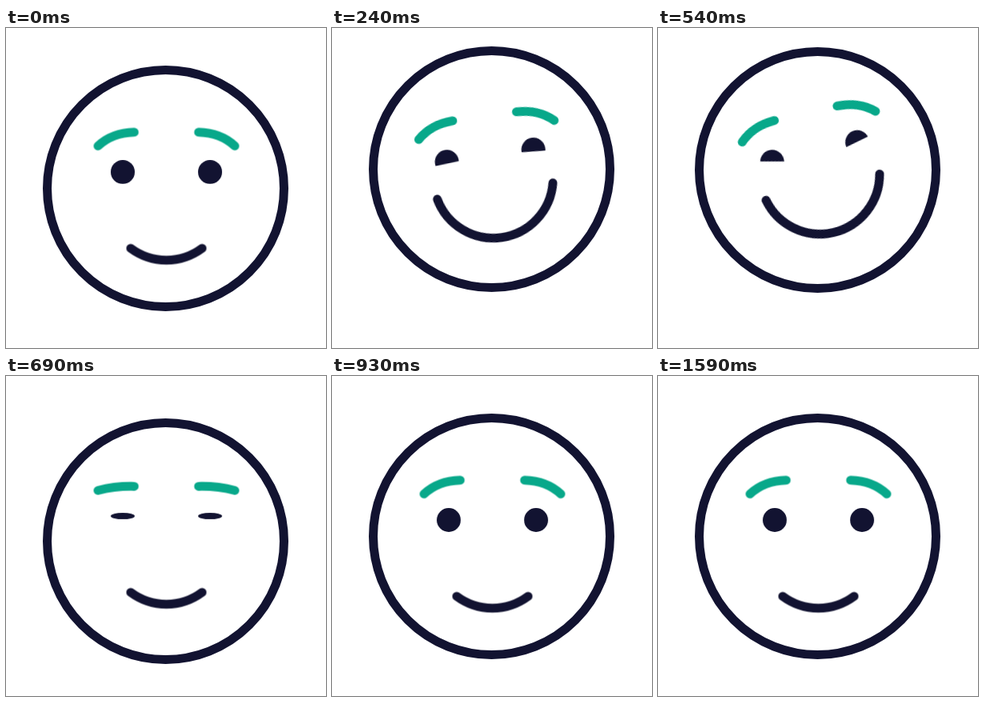
An HTML page without scripts for the animation above (3870 ms loop, 400 px wide and 400 px high).

```html
<!DOCTYPE html>
<html lang="en">
<head>
<meta charset="utf-8">
<title>Laughing face</title>
<style>
  html, body { margin: 0; height: 100%; overflow: hidden; background: #fff; }
  svg { display: block; width: 100%; height: 100%; }

  .line { fill: none; stroke: #121331; stroke-width: 11; stroke-linecap: round; }
  .brow { stroke: #08a88a; d: path("M-85.5 -53Q-68 -69.5 -40.2 -70.3"); }
  .eye { fill: #121331; }
  .lid { transform: translateY(20px); }

  .head, .features, .brow, .eye, .lid, .mouth { animation: 3.87s linear infinite; }
  .head { animation-name: bob; }
  .features { animation-name: tilt; }
  .brow { animation-name: frown; }
  .eye { animation-name: blink; }
  .lid { animation-name: squint; }
  .mouth { animation-name: smile; }

  @keyframes bob {
    0% { transform: none; animation-timing-function: ease-in-out; }
    2.8% { transform: translateY(6px); animation-timing-function: ease-in-out; }
    6.2% { transform: translateY(-24px); animation-timing-function: ease-out; }
    8.5% { transform: translateY(-27px); animation-timing-function: ease-in-out; }
    13.95% { transform: translateY(-23px); animation-timing-function: ease-in-out; }
    17.83% { transform: translateY(6px); animation-timing-function: ease-in-out; }
    24.03%, 100% { transform: none; }
  }
  @keyframes tilt {
    0%, 2.3% { transform: translateY(0) rotate(0); animation-timing-function: ease-in; }
    6.2% { transform: translateY(-20.5px) rotate(-8deg); animation-timing-function: ease-out; }
    13.95% { transform: translateY(-25.5px) rotate(-13deg); animation-timing-function: ease-in-out; }
    17.83% { transform: translateY(-5px) rotate(0); animation-timing-function: ease-out; }
    24.03%, 100% { transform: translateY(0) rotate(0); }
  }
  @keyframes frown {
    0%, 5.8%, 14.3%, 20.54%, 35.66%, 41.09%, 100% { d: path("M-85.5 -53Q-68 -69.5 -40.2 -70.3"); }
    3.1%, 17.83%, 38.37% { d: path("M-85.5 -52.5Q-64 -58 -40.2 -57.5"); }
  }
  @keyframes blink {
    0%, 5.8%, 14.3%, 20.54%, 35.66%, 41.09%, 100% { transform: none; }
    3.1%, 17.83%, 38.37% { transform: scaleY(.27); }
  }
  @keyframes squint {
    0%, 3.1% { transform: translateY(20px) rotate(-4deg); }
    6.2% { transform: translateY(2.2px) rotate(-4deg); animation-timing-function: ease-out; }
    13.95% { transform: translateY(-.5px) rotate(13deg); }
    15.5% { transform: translateY(2px) rotate(10deg); }
    17.83%, 100% { transform: translateY(20px) rotate(0); }
  }
  @keyframes smile {
    0%, 2.3%, 17.83%, 100% { transform: none; stroke-dasharray: 73.4 360; stroke-dashoffset: -53.3; }
    6.2%, 13.95% { transform: translateY(-7px); stroke-dasharray: 155 360; stroke-dashoffset: -12.5; }
  }
</style>
</head>
<body>
<svg viewBox="0 0 400 400">
  <clipPath id="lid"><rect class="lid" x="-40" y="-60" width="80" height="60"/></clipPath>
  <circle class="line head" cx="199.5" cy="200.5" r="148"/>
  <g transform="translate(200.5 200.5)">
    <g class="features">
      <g>
        <path class="line brow"/>
        <g transform="translate(-54.6 -20.5)" clip-path="url(#lid)"><circle class="eye" r="15"/></g>
      </g>
      <g transform="scale(-1 1)">
        <path class="line brow"/>
        <g transform="translate(-54.6 -20.5)" clip-path="url(#lid)"><circle class="eye" r="15"/></g>
      </g>
      <path class="line mouth" pathLength="180" stroke-dasharray="73.4 360" stroke-dashoffset="-53.3" d="M-74.7 15A74.7 74.7 0 0 0 74.7 15"/>
    </g>
  </g>
</svg>
</body>
</html>
```
